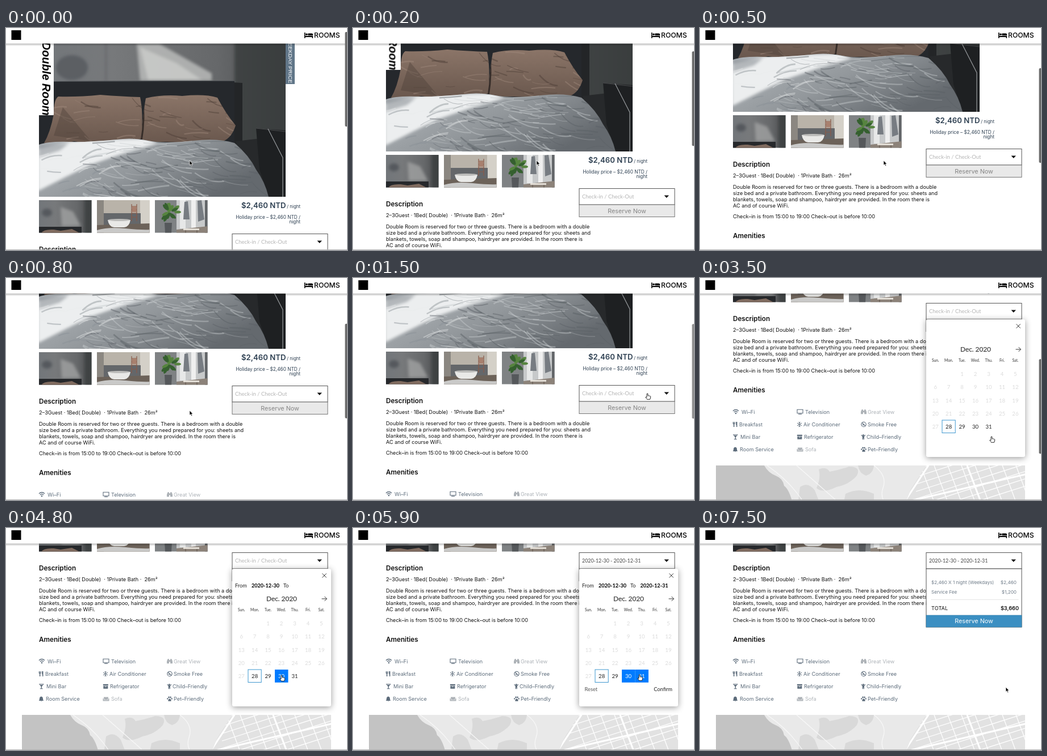
Animation, 600 px wide and 392 px high, one loop 8 s. Source, as an HTML page:

```html
<!DOCTYPE html>
<html lang="en">
<head>
<meta charset="utf-8">
<title>Double Room</title>
<style>
  html, body { margin: 0; width: 100%; height: 100%; overflow: hidden; background: #fff; }
  svg { display: block; width: 100vw; height: 100vh; }
  text { font-family: Inter, sans-serif; white-space: pre; }
  .lato { font-family: Lato, sans-serif; }
</style>
</head>
<body>
<svg id="stage" viewBox="0 0 600 392"></svg>
<script>
const LOOP = 8000, STEP = 100;
const INK = '#2c3e50', SLATE = '#5d6c7b', PALE = '#aeb3b8';

const text = (x, y, str, size, attrs = '') =>
  `<text x="${x}" y="${y}" font-size="${size}" ${attrs}>${str}</text>`;
const lato = (x, y, str, size, attrs = '') => text(x, y, str, size, 'class="lato" ' + attrs);
const rect = (x, y, w, h, fill, attrs = '') =>
  `<rect x="${x}" y="${y}" width="${w}" height="${h}" fill="${fill}" ${attrs}/>`;
const path = (d, fill, attrs = '') => `<path d="${d}" fill="${fill}" ${attrs}/>`;
const line = (d, color, width = 1, attrs = '') =>
  path(d, 'none', `stroke="${color}" stroke-width="${width}" ${attrs}`);
const group = (attrs, ...kids) => `<g ${attrs}>${kids.join('')}</g>`;
const MID = 'text-anchor="middle"', END = 'text-anchor="end"';

function random(seed) {
  return () => (seed = (seed * 16807) % 2147483647) / 2147483647;
}

const defs = `<defs>
  <filter id="soft"><feGaussianBlur stdDeviation=".7"/></filter>
  <filter id="blur" x="-20%" y="-20%" width="140%" height="140%"><feGaussianBlur stdDeviation="2.5"/></filter>
  <filter id="drop" x="-20%" y="-20%" width="140%" height="140%"><feGaussianBlur stdDeviation="6"/></filter>
  <linearGradient id="wall"><stop offset="0" stop-color="#72767a"/><stop offset=".3" stop-color="#77797b"/>
    <stop offset=".72" stop-color="#66686a"/><stop offset="1" stop-color="#484a4c"/></linearGradient>
  <linearGradient id="sheet" x2="1" y2=".5"><stop offset="0" stop-color="#b4b9bd"/>
    <stop offset=".55" stop-color="#92979b"/><stop offset="1" stop-color="#64696e"/></linearGradient>
  <linearGradient id="linen" x2="0" y2="1"><stop offset="0" stop-color="#8b7568"/>
    <stop offset="1" stop-color="#69574d"/></linearGradient>
  <linearGradient id="shade" x2="0" y2="1"><stop offset="0" stop-color="#000" stop-opacity=".3"/>
    <stop offset="1" stop-color="#000" stop-opacity="0"/></linearGradient>
  <clipPath id="photo"><rect x="58" width="434" height="298"/></clipPath>
  <clipPath id="bed"><path d="${bedShape()}"/></clipPath>
  <clipPath id="pillows"><path d="${pillowShape()}"/></clipPath>
  ${[58, 160, 262].map((x, i) =>
    `<clipPath id="thumb${i}"><rect x="${x}" y="304" width="92.5" height="57.5"/></clipPath>`).join('')}
</defs>`;

function bedShape() {
  return 'M58 206Q75 200 110 201T195 197Q222 193 250 199T330 199Q372 194 402 203Q428 225 440 250Q456 272 462 298H58Z';
}

function pillowShape() {
  return 'M67 203Q78 184 84 152Q84 126 92 121Q128 122 166 118Q205 121 236 122Q242 150 238 196Q160 207 120 200Q90 207 67 203Z' +
    'M238 196Q241 150 246 124Q275 117 310 120Q350 116 372 123Q386 150 404 172Q398 192 384 199Q320 203 280 201Q252 202 238 196Z';
}

// Short curved creases scattered over a box
function creases(seed, n, box, len, slope, dark, light) {
  const r = random(seed);
  let out = '';
  for (let i = 0; i < n; i++) {
    const x = box[0] + r() * box[2], y = box[1] + r() * box[3];
    const l = len * (.4 + r()), rise = l * slope * (r() - .25);
    out += line(`M${x} ${y}q${l / 2} ${rise - 4 + r() * 8} ${l} ${rise}`, i % 2 ? dark : light,
      .8 + r() * 2, 'opacity=".45"');
  }
  return out;
}

function bedroom() {
  return group('clip-path="url(#photo)"',
    rect(58, 0, 434, 298, 'url(#wall)'),
    group('filter="url(#blur)"',
      '<ellipse cx="116" cy="70" rx="28" ry="22" fill="#5b5f63"/>',
      line('M176 20V94', '#5f6367', 2),
      path('M230 28H270L362 80V93H236Z', '#c3c4c3', 'opacity=".75"'),
      path('M236 34L300 62L345 92H250Z', '#d6d6d4', 'opacity=".6"'),
      rect(402, 20, 100, 290, '#37393b', 'opacity=".75"')),
    path('M400 96L416 97V210L402 204Z', '#232527'),
    path('M58 154H84V94L402 93V215H58Z', '#25282c'),
    line('M84 94.500L402 93.500', '#494d51', 1.2),
    rect(58, 0, 26, 154, '#fff'),
    path('M404 200L492 190V298H440Z', '#27292b'),
    path('M440 177L492 181V298H462L446 250Z', '#1e2022'),
    line('M440 177L492 183', '#4a4c4e'),
    line('M461 178L487 229V298', '#909396', 1.3),
    path(pillowShape(), 'url(#linen)'),
    group('clip-path="url(#pillows)" filter="url(#soft)"',
      creases(17, 46, [72, 122, 320, 76], 34, .9, '#4c3d35', '#a08a7c'),
      path('M84 190L100 140L150 200Z', '#4c3f38', 'opacity=".4"'),
      line('M240 122Q245 160 238 200', '#362d29', 3)),
    path(bedShape(), 'url(#sheet)'),
    group('clip-path="url(#bed)"',
      path('M56 214L120 199L245 195L266 204L205 222L150 241L105 263L56 288Z', '#eceeef', 'filter="url(#blur)"'),
      path('M58 206L110 204L95 216L58 228Z', '#858b91', 'opacity=".55" filter="url(#blur)"'),
      group('filter="url(#soft)"',
        creases(91, 120, [135, 202, 300, 94], 40, .8, '#5a6065', '#c6cacd'),
        creases(33, 26, [58, 222, 110, 74], 34, -.7, '#8a9096', '#e8eaeb'))));
}

function thumbs() {
  const r = random(7);
  let leaves = '';
  for (let i = 0; i < 20; i++) {
    const a = r() * 6.28, d = 4 + r() * 12;
    const x = 287 + d * Math.cos(a), y = 325 + d * Math.sin(a);
    leaves += `<ellipse cx="${x}" cy="${y}" rx="6" ry="2.600" fill="${i % 2 ? '#35602f' : '#56843f'}"
      transform="rotate(${a * 57.3} ${x} ${y})"/>`;
  }
  const wall = group('clip-path="url(#thumb0)"',
    rect(58, 304, 93, 58, 'url(#wall)'),
    group('filter="url(#blur)"',
      '<ellipse cx="72" cy="326" rx="9" ry="7" fill="#55595d"/>',
      path('M96 316L118 324L132 350H98Z', '#a3a5a5', 'opacity=".75"'),
      rect(138, 300, 20, 66, '#3a3c3e', 'opacity=".7"')),
    rect(58, 351, 75, 11, '#26282b'),
    path('M62 362Q66 355 84 356L96 358L116 355L130 362Z', '#806b5f'));
  const bath = group('clip-path="url(#thumb1)"',
    rect(160, 304, 93, 58, '#b9b3a9'),
    rect(160, 304, 12, 58, '#8b8781'),
    rect(236, 304, 17, 58, '#d4d0c8'),
    rect(172, 327, 65, 22, '#64676a'),
    line('M221 311V341M230 311V341M221 315H230M221 321H230M221 327H230M221 334H230', '#8a5a48', 1.2),
    rect(222, 315, 7, 10, '#a8806e'),
    path('M160 348L253 345V362H160Z', '#6c6259'),
    path('M179 339Q199 336 219 339Q217 351 208 352H190Q181 351 179 339Z', '#e9e9e7'),
    '<ellipse cx="199" cy="339" rx="19" ry="2" fill="#bdbdbb"/>',
    path('M160 357Q180 351 210 354T253 356V362H160Z', '#c9c9c8'));
  const plant = group('clip-path="url(#thumb2)"',
    rect(262, 304, 93, 58, '#7f8284'),
    rect(300, 304, 55, 58, '#c7c9ca'),
    rect(306, 304, 10, 50, '#e7e8e8'), rect(326, 304, 8, 50, '#efefef'),
    path('M314 307L320 306L323 338H312ZM337 305L344 304L349 338L338 342Z', '#777c82'),
    rect(350, 304, 5, 58, '#626568'),
    path('M300 356L355 350V362H300Z', '#8c8279'),
    path('M312 354H340V357H312Z', '#e3ded6'),
    line('M316 357V362M336 357V362', '#5c5148'),
    leaves, path('M279 344H292L291 362H280Z', '#55585b'));
  return wall + bath + plant;
}

const icons = {
  wifi: line('M-5 -1.500Q0 -6 5 -1.500M-3.200 .600Q0 -2.200 3.200 .600', SLATE, 1.3) + '<circle cy="2.700" r="1.300"/>',
  tv: line('M-5 -4H5V2.500H-5Z', SLATE, 1.1) + rect(-3, 3.4, 6, 1.2, SLATE),
  binoculars: path('M-3.500 -4H-1V4H-5V0ZM3.500 -4H1V4H5V0ZM-1 -2H1V1H-1Z', PALE),
  utensils: line('M-3.500 -4.500V-1M-2 -4.500V-1M-.600 -4.500V-1', SLATE, .9) +
    path('M-4 -2H0L-1.200 0V4.500H-2.800V0ZM1.500 -4.500H3.800V4.500H2.300V1H1.500Z', SLATE),
  snow: line('M0 -4.500V4.500M-4 -2.300L4 2.300M-4 2.300L4 -2.300M-1.500 -4L0 -2.600L1.500 -4M-1.500 4L0 2.600L1.500 4', SLATE, 1),
  ban: '<circle r="4.200" fill="none" stroke="#5d6c7b" stroke-width="1.100"/>' +
    line('M-3 -3L3 3M-2.500 1H1', SLATE, 1.1),
  glass: path('M-4.500 -4.500H4.500L.700 .200V3.500H2.500V4.500H-2.500V3.500H-.700V.200Z', SLATE) +
    line('M-2.500 -3.200H2.500', '#fff', .7),
  box: path('M-4.500 -4H4.500V-1.700H-4.500ZM-4 -1H4V4H-4Z', SLATE) + rect(-1.500, 0, 3, .8, '#fff'),
  child: '<circle cy="-3.300" r="1.500"/>' + line('M-3.500 -3.500L-1.200 -1H1.200L3.500 -3.500', SLATE, 1.2) +
    path('M-1.600 -1.400H1.600V4.500H.300V2H-.300V4.500H-1.600Z', SLATE),
  bell: path('M0 -4.500Q3 -4 3 -.500Q3 1.500 4.200 3H-4.200Q-3 1.500 -3 -.500Q-3 -4 0 -4.500ZM-1.200 3.500H1.200L0 4.700Z', SLATE),
  sofa: path('M-4 -1.500V-3.500H4V-1.500L3 -.500V1H-3V-.500ZM-5.500 -1H-3.700V1.700H3.700V-1H5.500V3.500H-5.500Z', PALE),
  paw: '<circle cx="-3.700" cy="-.500" r="1.200"/><circle cx="-1.500" cy="-3" r="1.300"/><circle cx="1.500" cy="-3" r="1.300"/>' +
    '<circle cx="3.700" cy="-.500" r="1.200"/>' + path('M0 -.800Q3.200 1.500 2.600 3.700Q1 4.300 0 3.600Q-1 4.300 -2.600 3.700Q-3.200 1.500 0 -.800Z', SLATE)
};

function amenities() {
  const rows = [
    [['wifi', 'Wi–Fi', 73], ['tv', 'Television', 185], ['binoculars', 'Great View', 295]],
    [['utensils', 'Breakfast', 69], ['snow', 'Air Conditioner', 182], ['ban', 'Smoke Free', 295]],
    [['glass', 'Mini Bar', 71], ['box', 'Refrigerator', 183], ['child', 'Child–Friendly', 293]],
    [['bell', 'Room Service', 70], ['sofa', 'Sofa', 185], ['paw', 'Pet–Friendly', 295]]
  ];
  return rows.map((row, j) => row.map(([icon, label, x], i) => {
    const y = 555.3 + j * 22.2, color = /Great|Sofa/.test(label) ? PALE : SLATE;
    const cx = [63, 176, 288][i] + (x - [73, 185, 295][i]) / 3;
    return group(`transform="translate(${cx} ${y})" fill="${color}"`, icons[icon]) +
      text(x, y + 3.3, label, 9.15, `fill="${color}"`);
  }).join('')).join('');
}

function map() {
  let streets = '';
  for (let i = 0; i < 9; i++) streets += `M${388 + i * 24} 650l26 70M380 ${664 + i * 13 - 20}l200 ${-64}`;
  return group('', rect(28, 650, 544, 90, '#e9e9e9'),
    path('M28 650H113Q120 663 133 668T148 686Q160 694 168 740H28Z', '#c3c3c3'),
    path('M209 657Q222 651 228 661Q246 658 262 652Q284 652 276 668Q262 684 240 688Q216 700 205 690Q213 672 209 657Z' +
      'M176 688Q190 678 202 694L212 720H172ZM278 650H306Q305 664 292 668Q280 664 278 650ZM256 700Q280 688 306 700V730H250Z', '#d9d9d9'),
    line('M118 650Q150 672 170 698T190 730M306 650Q330 668 322 690T340 730M170 650L240 712', '#f8f8f8', 1.2),
    `<clipPath id="town"><path d="M398 650H572V740H352L372 690Z"/></clipPath>`,
    group('clip-path="url(#town)"', rect(350, 650, 230, 90, '#e2e2e2'), line(streets, '#fff', 1.3),
      line('M356 720L402 650M372 712L580 664M470 650L500 730', '#fff', 3)));
}

function article() {
  const body = [
    'Double Room is reserved for two or three guests. There is a bedroom with a double',
    'size bed and a private bathroom. Everything you need prepared for you: sheets and',
    'blankets, towels, soap and shampoo, hairdryer are provided. In the room there is',
    'AC and of course WiFi.'
  ];
  return group('fill="#111"',
    text(58, 395, 'Description', 11.7, 'font-weight="600"'),
    text(58, 414, '2–3Guest · 1Bed( Double)  · 1Private Bath ·  26m²', 9.15),
    ...body.map((s, i) => text(58, 433.8 + i * 11, s, 9.15)),
    text(58, 486.4, 'Check–in is from 15:00 to 19:00 Check–out is before 10:00', 9.15),
    text(58, 521.3, 'Amenities', 11.7, 'font-weight="600"'));
}

function booking() {
  return group(`fill="${INK}"`,
    text(492.5, 317.7, '$2,460 NTD', 13.2, `${END} font-weight="600"`),
    text(518, 317.7, '/ night', 7.9, END),
    text(518, 336.5, 'Holiday price – $2,460 NTD /', 8.25, END),
    text(518, 345, 'night', 8.25, END)) +
    rect(398, 363.5, 168, 28.5, '#fff', 'stroke="#555"') +
    lato(403, 381.3, 'Check-in / Check-Out', 9.47, 'id="hint" fill="#b5b5b5"') +
    lato(403, 381.3, '2020-12-30 - 2020-12-31', 8.9, 'id="range" fill="#444"') +
    path('M547.500 375.500H556L551.700 380Z', '#111') +
    group('id="idle"', rect(398, 392, 168, 21.5, '#e9e9e9', 'stroke="#777"'),
      text(482, 406.5, 'Reserve Now', 10.8, `${MID} fill="#858585"`));
}

function summary() {
  return group('id="bill" transform="translate(0 320)"',
    rect(398, 72, 168, 103, '#fff', 'stroke="#555"'),
    group('fill="#6d7a87"',
      text(407, 98.8, '$2,460 X 1 night (Weekdays)', 8.1), text(557, 98.8, '$2,460', 8.2, END),
      text(407, 116, 'Service Fee', 8.1), text(557, 116, '$1,200', 8.2, END)),
    line('M407 126.500H560', '#ccc', 1, 'stroke-dasharray="1 1"'),
    text(407, 144.500, 'TOTAL', 9.2, 'fill="#111"'),
    text(561, 144.500, '$3,660', 9.2, `${END} font-weight="600" fill="#111"`),
    rect(398, 154, 168, 21, '#3b8fc2', 'stroke="#3a7fa9" stroke-width=".6"'),
    text(482, 168.300, 'Reserve Now', 10.8, `${MID} fill="#fff"`));
}

function calendar() {
  const colX = i => 414.2 + i * 23.45;
  const names = ['Sun', 'Mon', 'Tue', 'Wed', 'Thu', 'Fri', 'Sat'];
  let days = '';
  for (let d = 1; d <= 31; d++) {
    days += lato(colX((d + 1) % 7), 173.3 + Math.floor((d + 1) / 7) * 23.1, d, 9.6,
      `${MID} id="day${d}" fill="${d < 28 ? '#dcdcdc' : '#222'}"`);
  }
  return group('id="popup" transform="translate(0 319)"',
    rect(398, 75, 174, 243, '#000', 'opacity=".4" filter="url(#drop)"'),
    rect(398, 73, 174, 243, '#fff', 'rx="3"'),
    line('M556.500 81.300L563.800 88.600M563.800 81.300L556.500 88.600', '#333', 1),
    line('M555.500 126H564.500M560.500 122L564.500 126L560.500 130', '#333', 1),
    lato(485, 130, 'Dec. 2020', 11.8, `${MID} fill="#444" stroke="#444" stroke-width=".250"`),
    ...names.map((n, i) => lato(colX(i), 148.200, n + '.', 6.7, `${MID} fill="#333"`)),
    rect(426, 251, 23.200, 22.500, '#fff', 'stroke="#3f97cf"'),
    rect(473, 251, 23.500, 22.800, '#007bff', 'id="cell30"'),
    rect(496.400, 251, 23.500, 22.800, '#007bff', 'id="cell31"'),
    days,
    group('id="from" fill="#222"', lato(403, 106, 'From', 9.2),
      lato(432, 106, '2020-12-30', 9.1, 'font-weight="700" fill="#000"'), lato(488, 106, 'To', 9.2)),
    group('id="to"', lato(505.500, 106, '2020-12-31', 9.1, 'font-weight="700"'),
      lato(407.500, 288.800, 'Reset', 9.3, 'fill="#555"'), lato(562, 288.800, 'Confirm', 9.3, `${END} fill="#222"`)));
}

function header() {
  return rect(0, 27, 600, 5, 'url(#shade)') + rect(0, 0, 600, 27.500, '#fff') +
    rect(9.500, 4, 17, 17, '#000') +
    path('M525 8H526.600V14H540V18H538.500V16H526.600V18H525ZM531.500 9.500H538Q540 9.500 540 11.500V13.300H531.500Z', '#000') +
    '<circle cx="529" cy="11.300" r="1.800"/>' +
    text(542, 17.200, 'ROOMS', 12.2, 'font-weight="500"');
}

const side = (x, y, str, size, attrs) =>
  text(0, 0, str, size, `transform="translate(${x} ${y}) rotate(90)" ${END} ${attrs}`);

const sans = 'style="font-family:\'Liberation Sans\',sans-serif"';
document.getElementById('stage').innerHTML = defs + rect(0, 0, 600, 392, '#fff') +
  group('id="page"', bedroom(),
    side(63.500, 154.500, 'Double Room', 20, `${sans} font-weight="700" font-style="italic"`),
    rect(492, 0, 16, 99, '#617688'),
    side(496.500, 97.500, 'WEEKDAY PRICE', 9.8, `${sans} fill="#fff"`),
    thumbs(), article(), amenities(), map(), booking(), summary(), calendar()) +
  header() +
  rect(596.500, 7, 5, 167, '#6b6b6b', 'id="thumb" rx="2"') +
  rect(0, 391, 600, 1, '#b5b5b5') +
  path('M0 0V8.300L1.900 6.600L3.300 9.700L4.700 9.100L3.300 6.100H5.800Z', '#000', 'id="arrow" stroke="#fff" stroke-width=".700"') +
  path('M-1 .500Q0 -.700 1 .500V4Q2 3.300 2.700 4.200Q3.800 3.600 4.300 4.600Q5.600 4.300 5.700 5.600Q5.800 8 4.500 10.300H-.500Q-1.500 8.500 -3.300 6.800Q-3.300 5.300 -1 6.600Z',
    '#fff', 'id="hand" stroke="#111" stroke-width=".900"');

const $ = id => document.getElementById(id);
const clamp = v => Math.min(1, Math.max(0, v));
const show = (id, on) => $(id).setAttribute('display', on ? 'inline' : 'none');
const move = (id, x, y) => $(id).setAttribute('transform', `translate(${x} ${y})`);
const easeOut = (t, start, end, power) => 1 - (1 - clamp((t - start) / (end - start))) ** power;

// time, x, y
const track = [
  [0, 323, 234], [1000, 323, 234], [1500, 518, 204], [1900, 518, 204], [2200, 557, 203],
  [2700, 557, 203], [3500, 513, 280], [3700, 513, 280], [4300, 485, 260], [4800, 485, 260],
  [5500, 504, 259], [6400, 504, 259], [7200, 538, 281], [LOOP, 538, 281]
];

function pointer(t) {
  const i = track.findIndex(k => k[0] > t);
  const [a, b] = [track[i - 1], track[i]];
  const p = (t - a[0]) / (b[0] - a[0]), e = p * p * (3 - 2 * p);
  return [a[1] + (b[1] - a[1]) * e, a[2] + (b[2] - a[2]) * e];
}

function update(t) {
  const scroll = Math.round(174 * easeOut(t, 0, 900, 2.44) + 146 * easeOut(t, 2700, 3700, 3));
  move('page', 0, -scroll);
  move('thumb', 0, scroll * .427);
  const fade = t < 2700 ? clamp((1800 - t) / 400) : clamp((4100 - t) / 400);
  $('thumb').setAttribute('opacity', fade);

  const first = t >= 4800, second = t >= 5700, done = t >= 7500;
  show('popup', t >= 2200 && !done);
  show('cell30', first);
  show('from', first);
  show('cell31', second);
  show('to', second);
  $('day30').setAttribute('fill', first ? '#fff' : '#222');
  $('day31').setAttribute('fill', second ? '#fff' : '#222');
  show('hint', !second);
  show('range', second);
  show('idle', !done);
  show('bill', done);

  const [x, y] = pointer(t), hand = t >= 1400 && !done;
  show('hand', hand);
  show('arrow', !hand);
  move(hand ? 'hand' : 'arrow', x, y);
}

const start = performance.now();
function tick() {
  const t = (performance.now() - start) % LOOP;
  update(Math.floor(t / STEP) * STEP);
  requestAnimationFrame(tick);
}
update(0);
requestAnimationFrame(tick);
</script>
</body>
</html>
```
